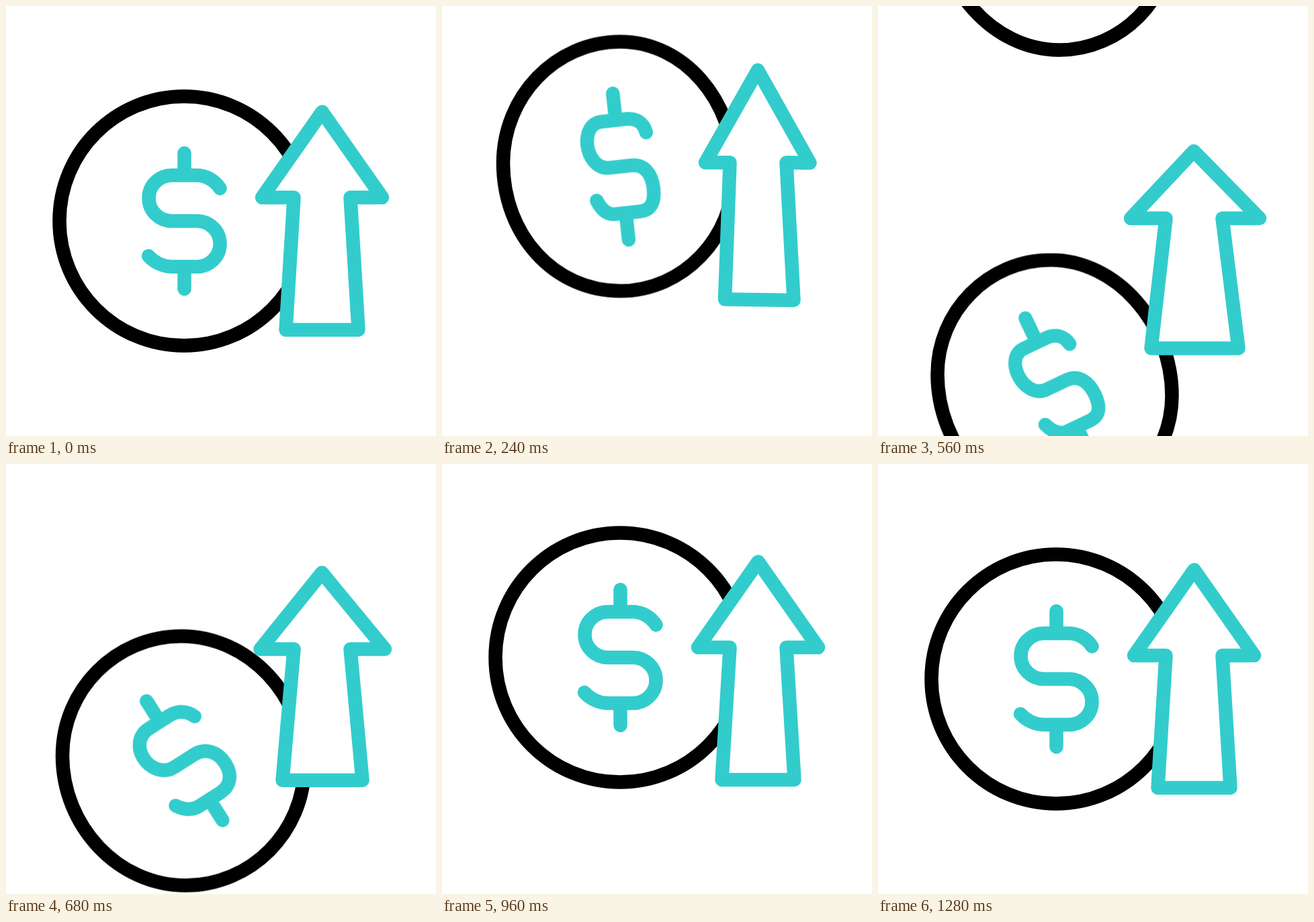
An HTML page without scripts that plays this animation: 640 px wide and 640 px high, repeating every 1480 ms.

```html
<!DOCTYPE html>
<html lang="en">
<head>
<meta charset="utf-8">
<title>Rising dollar coin</title>
<style>
html, body { margin: 0; height: 100%; overflow: hidden; background: #fff; }
svg { display: block; width: 100vw; height: 100vh; }

:root {
  --round: path("M0-185.5C102.5-185.5 185.5-102.5 185.5 0C185.5 102.5 102.5 185.5 0 185.5C-102.5 185.5-185.5 102.5-185.5 0C-185.5-102.5-102.5-185.5 0-185.5Z");
  --sign: path("M.5-101V-68M53.5-48.5C46-60 33-68 19-68H-18C-37-68-52.5-53-52.5-34S-37 0-18 0H19C38 0 53.5 15 53.5 34S38 68 19 68H-18C-32 68-45 61-53 52M.5 68V101");
  --thin-sign: path("M1-109V-69M44-46C42-60 32-69 17-69H-20C-36-69-45-55-45-37S-35 .5-16 .5H17C36 .5 46 16 46 38S38 70 22 70H-15C-28 70-35 60-40 47M1 70V110");
  --slim-sign: path("M.5-113V-72M39-46C37-60 30-71 16-71H-16C-32-71-41.5-56-41.5-38S-31 0-16 0H16C31 0 42.5 16 42.5 39S36 71 20 71H-14C-25 71-32 60-37 45.5M.5 72V114");
  --arrow: path("M470.5 157.5L560 285L512.5 285L524.5 482L416.5 482L428.5 285L381 285Z");
}

path { fill: none; stroke: #3cc; stroke-width: 20.5; stroke-linecap: round; stroke-linejoin: round; }
g, path { animation: 1480ms linear -2ms infinite; }
.leaving { animation-name: leave; }
.arriving { animation-name: arrive; }
.ring { d: var(--round); stroke: #000; animation-name: squash; }
.dollar { d: var(--sign); animation-name: tilt; }
.arrow { d: var(--arrow); fill: #fff; animation-name: bounce; }

/* One 40 ms tick is 2.7027 % of the loop; motion advances once per tick. */
@keyframes leave {
  0%, 5.4054% { transform: translate(265px, 320px); animation-timing-function: steps(4); }
  16.2162% { transform: translate(265px, 238.6px); animation-timing-function: steps(4); }
  27.027% { transform: translate(265px, 59px); animation-timing-function: steps(2); }
  32.4324% { transform: translate(265px, -33px); animation-timing-function: steps(2); }
  37.8378% { transform: translate(265px, -120px); animation-timing-function: steps(2); }
  43.2432% { transform: translate(265px, -193.5px); animation-timing-function: steps(4); }
  54.0541%, 100% { transform: translate(265px, -400px); }
}
@keyframes arrive {
  0%, 16.2162% { transform: translate(265px, 965px); animation-timing-function: steps(4); }
  27.027% { transform: translate(265px, 764.5px); animation-timing-function: steps(2); }
  32.4324% { transform: translate(265px, 652px); animation-timing-function: steps(2); }
  37.8378% { transform: translate(265px, 563.5px); animation-timing-function: steps(6); }
  54.0541% { transform: translate(265px, 320px); animation-timing-function: steps(2); }
  59.4595% { transform: translate(265px, 280px); animation-timing-function: steps(10); }
  86.4865%, 100% { transform: translate(265px, 320px); }
}
@keyframes squash {
  0%, 5.4054% { d: var(--round); animation-timing-function: steps(4); }
  16.2162% {
    d: path("M0-185.5C95-185.5 170-98 170 8C170 106 94 185.5 0 185.5C-97 185.5-174 103-174-5C-174-104-96-185.5 0-185.5Z");
    animation-timing-function: steps(4);
  }
  27.027% {
    d: path("M-1-185.5C94-185.5 169-91 169 20C169 111 95 185.5 4.5 185.5C-94 185.5-174 95-174-14.5C-174-108-98-185.5-1-185.5Z");
    animation-timing-function: steps(4);
  }
  37.8378% {
    d: path("M-8-185.5C89-185.5 172.5-92 172.5 16.5C172.5 109 97 185.5 4.5 185.5C-93 185.5-176.5 93-176.5-15.5C-176.5-109-101-185.5-8-185.5Z");
    animation-timing-function: steps(6);
  }
  54.0541%, 100% { d: var(--round); }
}
@keyframes tilt {
  0%, 5.4054% { d: var(--sign); transform: rotate(0deg); animation-timing-function: steps(4); }
  16.2162% { d: var(--thin-sign); transform: rotate(-6.2deg); animation-timing-function: steps(4); }
  27.027% { d: var(--slim-sign); transform: rotate(-20.3deg); animation-timing-function: steps(4); }
  37.8378% { d: var(--thin-sign); transform: rotate(-25.3deg); animation-timing-function: steps(6); }
  54.0541% { d: var(--sign); transform: rotate(-39.7deg); animation-timing-function: steps(2); }
  59.4595%, 100% { d: var(--sign); transform: rotate(0deg); }
}
@keyframes bounce {
  0%, 5.4054% { d: var(--arrow); transform: translateY(0); animation-timing-function: steps(4); }
  16.2162% {
    d: path("M470 95.5L547.5 233.5L512.5 233L523.5 438L421 436.5L428.5 233L392 233Z");
    transform: translateY(0); animation-timing-function: steps(4);
  }
  27.027% {
    d: path("M470 184L561.5 294.5L512.5 294.5L533.5 492L410.5 491.5L428.5 294.5L381.5 294.5Z");
    transform: translateY(0); animation-timing-function: steps(2);
  }
  32.4324% {
    d: path("M470 228L570 325L512.5 325L538.5 518.5L404.5 518.5L428.5 325L373.5 325Z");
    transform: translateY(0); animation-timing-function: steps(2);
  }
  37.8378% {
    d: path("M470 216L568 316L512.5 316L536.5 509.5L406.5 509.5L428.5 316L376 316Z");
    transform: translateY(0); animation-timing-function: steps(6);
  }
  54.0541% { d: var(--arrow); transform: translateY(-50px); animation-timing-function: steps(2); }
  59.4595% { d: var(--arrow); transform: translateY(-15px); animation-timing-function: steps(10); }
  86.4865%, 100% { d: var(--arrow); transform: translateY(0); }
}
</style>
</head>
<body>
<svg viewBox="0 0 640 640">
  <g class="leaving"><path class="ring"/><path class="dollar"/></g>
  <g class="arriving"><path class="ring"/><path class="dollar"/></g>
  <path class="arrow"/>
</svg>
</body>
</html>
```
